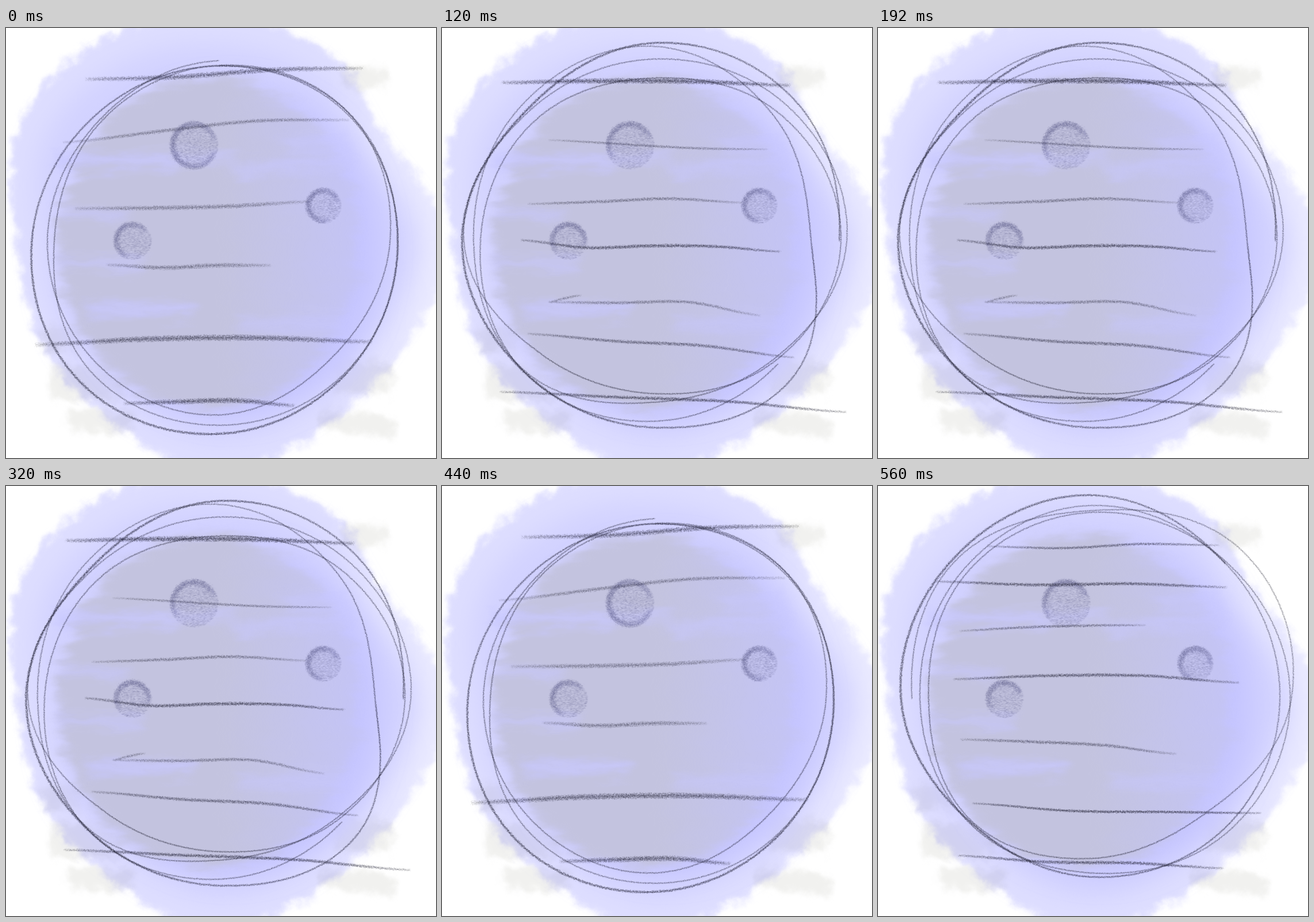
Animation of 748 by 748 pixels, one loop 0.64 s. Source, as an HTML page with a canvas:

```html
<!DOCTYPE html>
<html lang="en">
<head>
<meta charset="utf-8">
<title>Sketched planet</title>
<style>
  html, body { margin: 0; width: 100%; height: 100%; overflow: hidden; background: #fff; }
  svg, canvas { position: absolute; left: 0; top: 0; width: 748px; height: 748px; }
  canvas { opacity: 0; }
</style>
</head>
<body>
<svg viewBox="0 0 748 748">
  <defs>
    <linearGradient id="pale" gradientUnits="userSpaceOnUse" x1="560" x2="748">
      <stop stop-color="#dedeff"/><stop offset="1" stop-color="#ebebff"/>
    </linearGradient>
    <linearGradient id="grey">
      <stop offset=".55" stop-color="#c3c3df"/><stop offset="1" stop-color="#c3c3df" stop-opacity=".3"/>
    </linearGradient>
    <filter id="edge" filterUnits="userSpaceOnUse" x="-60" y="-60" width="870" height="870" color-interpolation-filters="sRGB">
      <feGaussianBlur stdDeviation="6" result="b"/>
      <feTurbulence type="fractalNoise" baseFrequency=".035" numOctaves="5" seed="4" result="n"/>
      <feDisplacementMap in="b" in2="n" scale="28" xChannelSelector="R" yChannelSelector="G"/>
    </filter>
    <filter id="wash" filterUnits="userSpaceOnUse" x="-60" y="-60" width="870" height="870" color-interpolation-filters="sRGB">
      <feGaussianBlur stdDeviation="9" result="b"/>
      <feTurbulence type="fractalNoise" baseFrequency=".012 .04" numOctaves="4" seed="9" result="n"/>
      <feDisplacementMap in="b" in2="n" scale="40" xChannelSelector="R" yChannelSelector="G"/>
    </filter>
    <filter id="soft" filterUnits="userSpaceOnUse" x="-60" y="-60" width="870" height="870">
      <feGaussianBlur stdDeviation="24"/>
    </filter>
  </defs>
  <path id="rim" filter="url(#edge)" fill="url(#pale)"/>
  <g filter="url(#edge)" fill="none" stroke="#f1f1ef" style="mix-blend-mode: multiply">
    <path stroke-width="36" d="M585 86H663"/>
    <path stroke-width="56" d="M76 618H210M570 605L670 610"/>
    <path stroke-width="36" d="M108 684H220M545 680L674 694"/>
    <path stroke-width="46" d="M66 540H130"/>
  </g>
  <path id="body" filter="url(#soft)" fill="#d2d2ff"/>
  <ellipse filter="url(#soft)" fill="#c5c5ff" cx="390" cy="388" rx="262" ry="285"/>
  <ellipse filter="url(#wash)" fill="url(#grey)" cx="352" cy="374" rx="262" ry="288"/>
  <g filter="url(#wash)" fill="none" stroke="#c8c8ff" opacity=".85">
    <path stroke-width="22" d="M90 232H290M140 490H320"/>
    <path stroke-width="14" d="M290 228H400M90 410H240M400 250L600 236M90 324H210"/>
    <path stroke-width="26" opacity=".6" d="M400 515H600M480 200H600"/>
  </g>
</svg>
<script>
const SIZE = 748, LOOP = 640, MID = 370, TURN = 2 * Math.PI;
const INK = '#2b2b3c', SHADE = '#5a5a80';

let seed = 7;
function rand() {
  seed = (seed * 16807) % 2147483647;
  return seed / 2147483647;
}

const clamp = (i, n) => Math.max(0, Math.min(n - 1, i));
const wrap = (i, n) => (i + n) % n;

// Smooth curve through evenly spaced keys, t in 0..1
function curve(keys, t, index = clamp) {
  const n = keys.length;
  const p = t * (index === wrap ? n : n - 1);
  const i = Math.floor(p), u = p - i;
  const [a, b, c, d] = [-1, 0, 1, 2].map(k => keys[index(i + k, n)]);
  return b + u * (c - a + u * (2 * a - 5 * b + 4 * c - d + u * (3 * (b - c) + d - a))) / 2;
}

const polar = (x, y, r, turn) => [x + r * Math.cos(turn * TURN), y + r * Math.sin(turn * TURN)];
const bell = (t, peak, spread) => Math.exp(-(((t - peak) / spread) ** 2));

// Grainy stroke along place(t) with varying width and tone
function pencil(g, length, place, width, tone, color = INK) {
  const steps = Math.ceil(length * 2);
  g.fillStyle = color;
  for (let s = 0; s <= steps; s++) {
    const t = s / steps, [x, y] = place(t), w = width(t);
    const jitter = () => (rand() + rand() - 1) * w * .6 - .5;
    g.globalAlpha = tone(t) * .29;
    for (let k = 0; k < w; k++) g.fillRect(x + jitter(), y + jitter(), 1, 1);
  }
}

// Continuous clockwise outline, eight radii to a turn
function outline(g, { start, radii, heavy }) {
  const turns = (radii.length - 1) / 8;
  pencil(g, turns * TURN * 315,
    t => polar(MID, MID, curve(radii, t), start + t * turns),
    t => 2.8 + 2 * bell(t, heavy, .09),
    t => .5 + .3 * bell(t, heavy, .09));
}

function band(g, x0, x1, w, tone, ...ys) {
  pencil(g, x1 - x0,
    t => [x0 + (x1 - x0) * t, curve(ys, t)],
    t => w * (.75 + .25 * Math.sin(Math.PI * t)),
    t => tone * (.3 + .7 * Math.sin(Math.PI * t) ** .7));
}

// Rubbed disc with a darker arc, given in turns
function crater(g, x, y, r, from, to) {
  g.fillStyle = SHADE;
  g.globalAlpha = .07;
  for (let i = 0; i < r * r * 1.8; i++) {
    const [px, py] = polar(x, y, Math.sqrt(rand()) * r, rand());
    g.fillRect(px - 1.5, py - .5, 3, 1);
  }
  pencil(g, (to - from) * TURN * r,
    t => polar(x, y, r - 5, from + (to - from) * t),
    () => 12,
    t => .12 + .3 * Math.sin(Math.PI * t), SHADE);
}

const craters = [[327, 204, 42], [552, 309, 31], [220, 370, 33]];

const poses = {
  A: {
    start: .75, heavy: .19,
    radii: [304, 317, 311, 320, 336, 344, 325, 306, 304, 314, 312, 318, 321, 318, 286, 291,
      305, 317, 298, 283, 303, 301, 298, 295, 313],
    arcs: [[.05, .95], [.2, .95], [.3, .9]],
    bands: [
      [140, 620, 9, .6, 89, 85, 73, 70],
      [100, 597, 7, .4, 199, 180, 162, 160],
      [120, 527, 8, .4, 314, 313, 310, 302],
      [176, 460, 8, .42, 412, 417, 413, 413],
      [52, 634, 10, .65, 551, 541, 539, 546],
      [206, 502, 9, .7, 653, 650, 648, 657]
    ]
  },
  B: {
    start: .125, heavy: .88,
    radii: [303, 314, 322, 303, 295, 283, 310, 324, 296, 266, 279, 332, 314, 316, 329, 334,
      292, 281, 320, 315, 330, 338, 299, 272, 338, 325, 322, 335, 318, 344, 345, 321],
    arcs: [[.4, .95], [.25, .95], [.4, 1.05]],
    bands: [
      [105, 605, 9, .8, 95, 92, 93, 100],
      [186, 565, 5, .4, 195, 202, 209, 211],
      [150, 522, 6, .45, 306, 302, 297, 304],
      [138, 588, 6, .8, 369, 382, 379, 380, 389],
      [186, 242, 5, .35, 477, 470, 465],
      [186, 553, 6, .42, 477, 478, 477, 500],
      [150, 612, 6, .6, 532, 545, 553, 573],
      [102, 703, 6, .75, 633, 642, 650, 668]
    ]
  },
  C: {
    start: .5, heavy: .9,
    radii: [311, 336, 327, 368, 349, 282, 278, 297, 282, 307, 324, 335, 347, 332, 303, 302,
      297, 315, 336, 332, 329, 324, 310, 300, 330, 341, 354, 332],
    arcs: [[.4, .95], [.3, 1.02], [.4, .95]],
    bands: [
      [190, 592, 5, .6, 105, 108, 101, 103],
      [102, 606, 6, .75, 166, 172, 170, 176],
      [143, 465, 5, .5, 252, 246, 243, 242],
      [132, 628, 6, .7, 336, 330, 330, 342],
      [144, 518, 6, .5, 441, 445, 451, 466],
      [165, 666, 5, .85, 552, 565, 567, 569],
      [140, 600, 6, .75, 643, 654, 656, 665]
    ]
  }
};

const steps = [[0, 'A'], [120, 'B'], [240, 'C'], [320, 'B'], [440, 'A'], [560, 'C'], [LOOP, 'A']];

// Paint blot behind the drawing
const blot = [400, 372, 372, 400, 367, 358, 352, 402, 405, 390, 380, 342];
function blotPath(scale) {
  const points = Array.from({ length: 72 }, (_, i) =>
    polar(MID, MID, curve(blot, i / 72, wrap) * scale, i / 72).map(Math.round));
  return `M${points.join('L')}Z`;
}
document.getElementById('rim').setAttribute('d', blotPath(1));
document.getElementById('body').setAttribute('d', blotPath(.87));

function sketch(pose) {
  const canvas = document.createElement('canvas');
  canvas.width = canvas.height = SIZE;
  const g = canvas.getContext('2d');
  craters.forEach((c, i) => crater(g, ...c, ...pose.arcs[i]));
  outline(g, pose);
  pose.bands.forEach(b => band(g, ...b));
  document.body.append(canvas);
  return canvas;
}

const layers = Object.keys(poses).map(name => [name, sketch(poses[name])]);

for (const [name, canvas] of layers) {
  const frames = steps.map(([time, pose]) => ({
    offset: time / LOOP, opacity: pose === name ? 1 : 0, easing: 'steps(1, end)'
  }));
  canvas.animate(frames, { duration: LOOP, iterations: Infinity });
}
</script>
</body>
</html>
```
